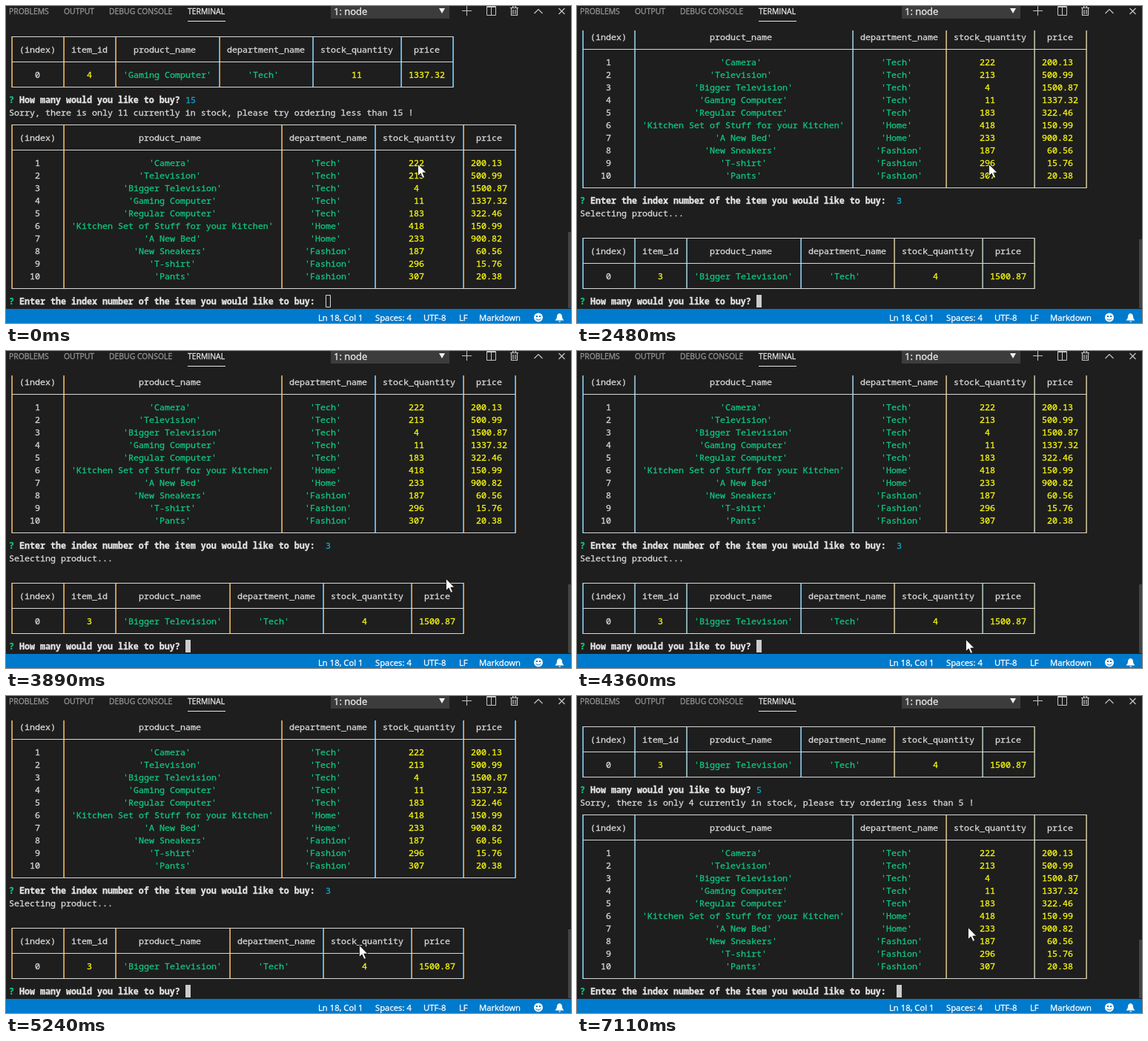
Recreate the animation shown at these times as an HTML page with a canvas. Size 762x428 px, loop 8000 ms.

```html
<!DOCTYPE html>
<html lang="en">
<head>
<meta charset="utf-8">
<title>Terminal shop</title>
<style>
  html, body { margin: 0; width: 100%; height: 100%; overflow: hidden; background: #1e1e1e; }
  canvas { display: block; }
</style>
</head>
<body>
<canvas id="stage" width="762" height="428"></canvas>
<script>
const ctx = document.getElementById('stage').getContext('2d');
const LOOP = 8000, STEP = 80;
const LEFT = 4, TOP = 33, CELL = 7, LINE = 17;
const MONO = '11.667px "Noto Sans Mono", "DejaVu Sans Mono", monospace';
const SANS = '"Open Sans", "Noto Sans", sans-serif';
const C = { bg: '#1e1e1e', text: '#d8d8d8', bold: '#e5e5e5', green: '#0fc680',
            yellow: '#f8f810', cyan: '#11a8cd', orange: '#d9a75a', blue: '#5f9fc8' };

const products = [
  ['Camera', 'Tech', 222, '200.13'],
  ['Television', 'Tech', 213, '500.99'],
  ['Bigger Television', 'Tech', 4, '1500.87'],
  ['Gaming Computer', 'Tech', 11, '1337.32'],
  ['Regular Computer', 'Tech', 183, '322.46'],
  ['Kitchen Set of Stuff for your Kitchen', 'Home', 418, '150.99'],
  ['A New Bed', 'Home', 233, '900.82'],
  ['New Sneakers', 'Fashion', 187, '60.56'],
  ['T-shirt', 'Fashion', 296, '15.76'],
  ['Pants', 'Fashion', 307, '20.38']
].map(([name, dept, stock, price]) => [`'${name}'`, `'${dept}'`, String(stock), price]);
const fields = ['product_name', 'department_name', 'stock_quantity', 'price'];

// Pointer paths: start time, then one point per step.
const paths = [
  [0, [[555, 213]]],
  [3180, [[557, 217], [564, 233], [573, 256], [582, 279], [589, 295], [594, 304], [596, 307]]],
  [3890, [[593, 307], [588, 308]]],
  [4120, [[583, 314], [570, 334], [550, 363], [524, 389], [494, 403], [464, 397],
          [446, 375], [443, 349], [454, 326], [494, 306], [518, 316]]],
  [5000, [[516, 353], [494, 384], [471, 366], [476, 336], [500, 318], [526, 312]]],
  [5560, [[527, 312]]]
];

function pointerAt(t) {
  const [start, points] = paths.filter(p => p[0] <= t).pop();
  return points[Math.min(points.length - 1, Math.floor((t - start) / STEP))];
}

function rect(x, y, w, h, color) {
  ctx.fillStyle = color;
  ctx.fillRect(x, y, w, h);
}

// A hairline stroke gives the text the weight of screen-hinted type.
function label(text, x, y, color, font) {
  ctx.font = font;
  ctx.fillStyle = ctx.strokeStyle = color;
  ctx.lineWidth = .3;
  ctx.fillText(text, x, y);
  ctx.strokeText(text, x, y);
}

function put(text, col, row, color = C.text, weight = '') {
  label(text, LEFT + col * CELL, TOP + row * LINE + 13, color, `${weight} ${MONO}`);
}

function stroke(d, color = '#c5c5c5', width = 1) {
  ctx.strokeStyle = color;
  ctx.lineWidth = width;
  ctx.stroke(new Path2D(d));
}

function fill(d, color) {
  ctx.fillStyle = color;
  ctx.fill(new Path2D(d));
}

function table(row, head, body) {
  const widths = head.map((h, i) => 2 + Math.max(h.length, ...body.map(r => r[i].length)));
  const edges = widths.reduce((list, w) => [...list, list[list.length - 1] + w + 1], [0]);
  const lineX = col => LEFT + 3 + col * CELL;
  const lineY = r => TOP + 8 + r * LINE;
  const last = row + body.length + 3;
  const top = lineY(row), height = lineY(last) - top + 1;
  // Vertical rules straddle two pixels, with a colour fringe on each side.
  for (const e of edges) {
    rect(lineX(e), top, 1, height, C.blue);
    rect(lineX(e) + 1, top, 1, height, C.orange);
  }
  for (const r of [row, row + 2, last])
    rect(lineX(0) + 1, lineY(r), lineX(edges[edges.length - 1]) - lineX(0), 1, C.text);
  [head, ...body].forEach((cells, n) => cells.forEach((text, i) => {
    const col = edges[i] + 1 + Math.floor((widths[i] - text.length) / 2);
    const color = n === 0 || i === 0 ? C.text : text[0] === "'" ? C.green : C.yellow;
    put(text, col, n ? row + 2 + n : row + 1, color);
  }));
}

const catalogue = row =>
  table(row, ['(index)', ...fields], products.map((p, i) => [String(i + 1), ...p]));

const selection = (row, id) =>
  table(row, ['(index)', 'item_id', ...fields], [['0', String(id), ...products[id - 1]]]);

// Returns the column after the answer, where the caret stands.
function prompt(row, question, answer = '', color = C.cyan) {
  put('?', 0, row, C.green, 'bold');
  put(question, 2, row, C.bold, 'bold');
  const col = 3 + question.length;
  put(answer, col, row, color);
  return col + answer.length;
}

const ASK_ITEM = 'Enter the index number of the item you would like to buy: ';
const ASK_COUNT = 'How many would you like to buy?';

function rejectedScreen(id, count, typed) {
  const stock = products[id - 1][2];
  selection(0, id);
  prompt(5, ASK_COUNT, count);
  put(`Sorry, there is only ${stock} currently in stock, please try ordering less than ${count} !`, 0, 6);
  catalogue(7);
  return prompt(21, ASK_ITEM, typed, C.text);
}

function selectedScreen(id, typed) {
  catalogue(-1);
  prompt(13, ASK_ITEM, String(id));
  put('Selecting product...', 0, 14);
  selection(16, id);
  return prompt(21, ASK_COUNT, typed, C.text);
}

function terminal(t) {
  ctx.save();
  ctx.beginPath();
  ctx.rect(0, TOP, 762, 374);
  ctx.clip();
  const caret = t < 2480 ? rejectedScreen(4, '15', t < 1470 ? '' : '3')
    : t < 7110 ? selectedScreen(3, t < 5950 ? '' : '5')
    : rejectedScreen(3, '5', '');
  const x = LEFT + caret * CELL, y = TOP + 21 * LINE;
  if (t < 220) stroke(`M${x + .5} ${y + .5}h6v16h-6z`, C.text);
  else rect(x, y, CELL, LINE, '#cccccc');
  ctx.restore();
  const thumb = t < 2480 ? 305 : t < 7110 ? 315 : 329;
  rect(758, thumb, 4, 408 - thumb, '#434343');
}

function header() {
  const tabs = [['PROBLEMS', 4], ['OUTPUT', 78], ['DEBUG CONSOLE', 139], ['TERMINAL', 245]];
  for (const [name, x] of tabs)
    label(name, x, 11, name === 'TERMINAL' ? '#e7e7e7' : '#969696', `10.4px ${SANS}`);
  rect(245, 20, 51, 1, '#e7e7e7');
  rect(438, 0, 160, 17, '#3c3c3c');
  label('1: node', 442, 12, '#f0f0f0', `13px ${SANS}`);
  fill('M584 3h8l-4 7z', '#f0f0f0');
  stroke('M615 6.5h13M621.5 0v13');
  stroke('M648.5 .5h12v12h-12zM654.5 0v13M648 1.5h13');
  stroke('M680 2.5h11M683.5 2v-2h4v2M681.5 3v9.5h8v-9.5M684 5v6M687 5v6', '#c5c5c5', 1.2);
  stroke('M712.5 10l5.5-5.5l5.5 5.5M745.5 3l8 8m0-8l-8 8', '#c5c5c5', 1.2);
}

function statusBar() {
  rect(0, 409, 762, 19, '#007acc');
  const items = [['Ln 18, Col 1', 421], ['Spaces: 4', 498], ['UTF-8', 563], ['LF', 611], ['Markdown', 638]];
  for (const [text, x] of items) label(text, x, 425, '#fff', `11.3px ${SANS}`);
  ctx.beginPath();
  ctx.arc(718, 420.5, 6, 0, 2 * Math.PI);
  ctx.fillStyle = '#fff';
  ctx.fill();
  rect(715, 418, 2, 2, '#007acc');
  rect(719, 418, 2, 2, '#007acc');
  stroke('M714.5 422q3.5 4 7 0', '#007acc');
  fill('M740.5 424.5q2.5-2 2.5-5q0-4 3.5-4.5q3.5 .5 3.5 4.5q0 3 2.5 5zM745 425.5h3.5q-1.7 2.5-3.5 0z', '#fff');
}

function pointer(t) {
  const [x, y] = pointerAt(t);
  if (t >= 220 && t < 380) {
    ctx.beginPath();
    ctx.arc(x, y, 12, 0, 2 * Math.PI);
    ctx.fillStyle = 'rgba(255, 255, 0, .47)';
    ctx.fill();
  }
  const arrow = `M${x + .5} ${y + .5}v16l3.7-3.5l2.8 6.3l2.5-1.1l-2.7-6.1h5z`;
  fill(arrow, '#fff');
  stroke(arrow, '#111', .8);
}

function draw(now) {
  const t = now % LOOP;
  rect(0, 0, 762, 428, C.bg);
  header();
  terminal(t);
  statusBar();
  pointer(t);
}

const began = performance.now();
function tick() {
  draw(performance.now() - began);
  requestAnimationFrame(tick);
}
tick();
</script>
</body>
</html>
```
